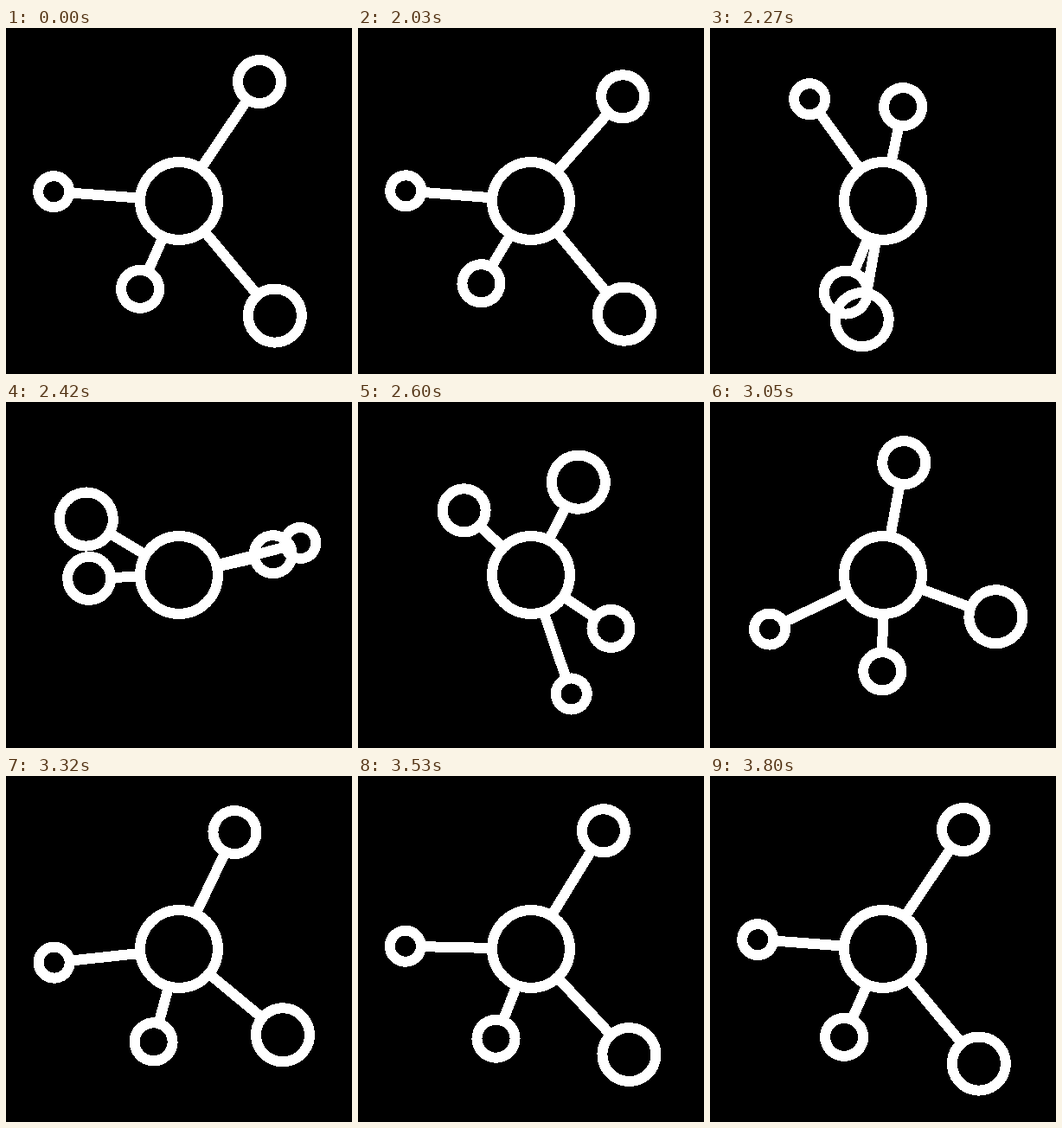
An HTML page that plays this animation: 400 by 400 pixels, repeating every 3830 ms.

```html
<!DOCTYPE html>
<html lang="en">
<head>
<meta charset="utf-8">
<title>Orbiting nodes</title>
<style>
  html, body { margin: 0; width: 100%; height: 100%; overflow: hidden; background: #000; }
  svg { display: block; width: 100%; height: 100%; }
  circle, line { fill: none; stroke: #fff; stroke-width: 12; shape-rendering: crispEdges; }
</style>
</head>
<body>
<svg viewBox="0 0 400 400">
  <g id="hub" transform="translate(200 200)"><circle r="45"/></g>
</svg>
<script>
const LOOP = 3830, HOLD = 2030, STEP = 30, STEPS = 60, HUB = 45;

// Same maths as CSS cubic-bezier, solved by bisection
function bezier(x1, y1, x2, y2) {
  const curve = (a, b, t) => 3 * a * t * (1 - t) ** 2 + 3 * b * t * t * (1 - t) + t ** 3;
  return x => {
    if (x <= 0) return 0;
    if (x >= 1) return 1;
    let lo = 0, hi = 1;
    for (let i = 0; i < 30; i++) {
      const mid = (lo + hi) / 2;
      if (curve(x1, x2, mid) < x) lo = mid; else hi = mid;
    }
    return curve(y1, y2, lo);
  };
}

const brisk = bezier(0.167, 0.167, 0, 1);
const gentle = bezier(0.333, 0, 0, 1);
const pullIn = bezier(0.167, 0.167, 0.667, 1);
const pushOut = bezier(0.333, 0, 0.667, 1);

// near: closest distance to the hub, reached at step `turn`
const nodes = [
  { r: 25, angle: -56, far: 166.4, near: 103.8, turn: 13, spin: brisk },
  { r: 18, angle: 184.3, far: 145.2, near: 145.2, turn: 30, spin: gentle },
  { r: 22, angle: 113.8, far: 111.3, near: 111.3, turn: 30, spin: brisk },
  { r: 31, angle: 50.1, far: 172.8, near: 120.2, turn: 18, spin: gentle }
];

const hub = document.getElementById('hub');

function add(parent, tag, attrs = {}) {
  const el = document.createElementNS('http://www.w3.org/2000/svg', tag);
  for (const key in attrs) el.setAttribute(key, attrs[key]);
  return parent.appendChild(el);
}

for (const node of nodes) {
  node.arm = add(hub, 'g');
  node.rod = add(node.arm, 'line', { x1: HUB });
  node.ring = add(node.arm, 'circle', { r: node.r });
}

function distance({ far, near, turn }, step) {
  return step < turn
    ? far + (near - far) * pullIn(step / turn)
    : near + (far - near) * pushOut((step - turn) / (STEPS - turn));
}

function draw(time) {
  const t = time % LOOP;
  const step = Math.max(0, Math.min(STEPS, Math.floor((t - HOLD) / STEP) + 1));
  for (const node of nodes) {
    const d = distance(node, step);
    const angle = node.angle + 360 * node.spin(step / STEPS);
    node.arm.setAttribute('transform', `rotate(${angle})`);
    node.rod.setAttribute('x2', d - node.r);
    node.ring.setAttribute('cx', d);
  }
}

const start = performance.now();
function tick() {
  draw(performance.now() - start);
  requestAnimationFrame(tick);
}
tick();
</script>
</body>
</html>
```
